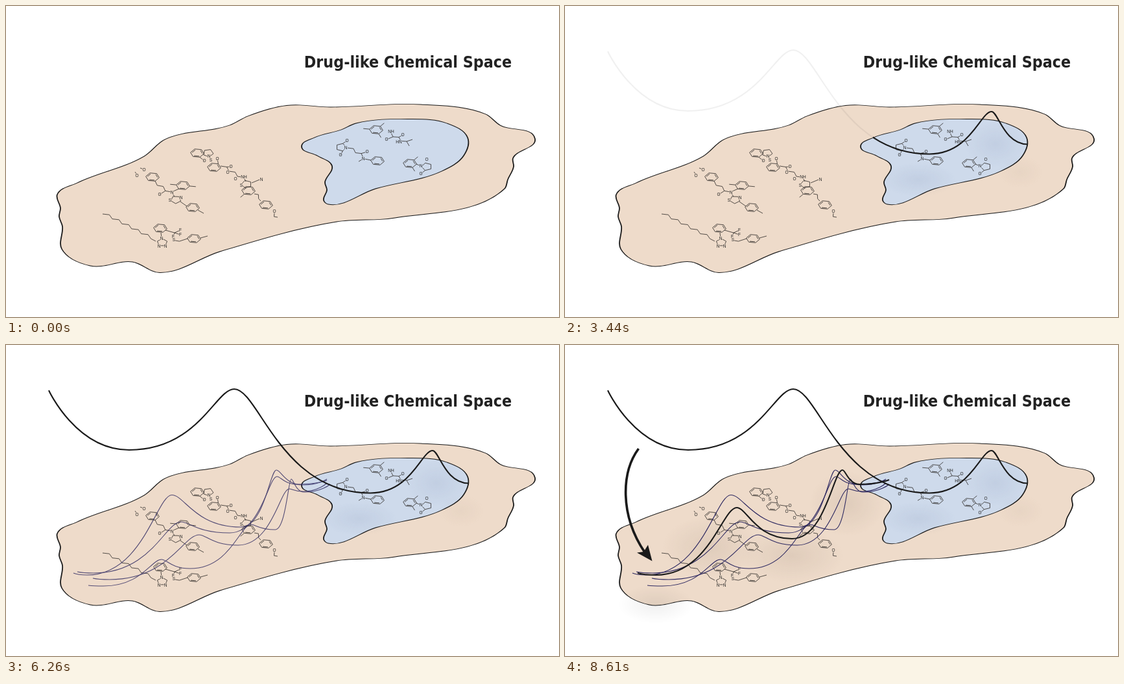
Animation of 853x480 px, one loop 9.74 s. Source, as an HTML page:

```html
<!DOCTYPE html>
<html lang="en">
<head>
<meta charset="utf-8">
<title>Drug-like Chemical Space</title>
<style>
html, body { margin: 0; width: 100%; height: 100%; overflow: hidden; background: #fff; }
svg { display: block; width: 100vw; height: 100vh; }
path { fill: none; stroke: #1a1a1a; stroke-linejoin: round; }
.title { font: bold 24.8px "DejaVu Sans Condensed", "DejaVu Sans", sans-serif; font-stretch: condensed; fill: #222; }
#molecules path { stroke: #2b2725; stroke-width: .8; }
#molecules text { font: 6.5px "Liberation Sans", sans-serif; fill: #222; text-anchor: middle; paint-order: stroke; stroke-width: 1.6; }
#trails path { stroke: #2d2860; }
.fade { opacity: 0; animation: 9740ms steps(16, start) infinite; }
.one { animation-name: one; }
.two { animation-name: two; }
.three { animation-name: three; }
.four { animation-name: four; }
/* Each reveal takes 16 steps of 60 ms. */
@keyframes one { 0%, 13.737% { opacity: 0 } 23.593%, 100% { opacity: 1 } }
@keyframes two { 0%, 35.298% { opacity: 0 } 45.154%, 100% { opacity: 1 } }
@keyframes three { 0%, 56.858% { opacity: 0 } 66.715%, 100% { opacity: 1 } }
@keyframes four { 0%, 79.138% { opacity: 0 } 88.994%, 100% { opacity: 1 } }
</style>
</head>
<body>
<svg viewBox="0 0 853 480" preserveAspectRatio="none">
  <defs>
    <radialGradient id="tan"><stop offset="0" stop-color="#6b5644" stop-opacity=".11"/><stop offset="1" stop-color="#6b5644" stop-opacity="0"/></radialGradient>
    <radialGradient id="navy"><stop offset="0" stop-color="#5a6c9a" stop-opacity=".1"/><stop offset="1" stop-color="#5a6c9a" stop-opacity="0"/></radialGradient>
    <radialGradient id="grey"><stop offset="0" stop-color="#000" stop-opacity=".06"/><stop offset="1" stop-color="#000" stop-opacity="0"/></radialGradient>
    <clipPath id="west"><path d="M0 0H475V480H0Z"/></clipPath>
    <clipPath id="east"><path d="M475 0H853V480H475Z"/></clipPath>
  </defs>
  <g id="land"></g>
  <g class="fade four">
    <ellipse cx="140" cy="400" rx="58" ry="30" fill="url(#grey)"/>
    <ellipse cx="225" cy="312" rx="75" ry="48" fill="url(#tan)"/>
    <ellipse cx="350" cy="325" rx="80" ry="42" fill="url(#tan)"/>
    <ellipse cx="435" cy="245" rx="58" ry="50" fill="url(#tan)"/>
  </g>
  <g id="lake"></g>
  <g class="fade one">
    <ellipse cx="664" cy="213" rx="48" ry="36" fill="url(#navy)"/>
    <ellipse cx="545" cy="268" rx="58" ry="26" fill="url(#navy)"/>
    <ellipse cx="702" cy="256" rx="36" ry="25" fill="url(#tan)" opacity=".4"/>
  </g>
  <g id="molecules"></g>
  <g class="fade three" id="trails"></g>
  <g class="fade four" id="route">
    <path d="M113.500 160C87 196 84 262 123 320" stroke-width="3.7"/>
    <path d="M134.500 333.500L111 320.500L121.500 319L128 308.500Z" style="fill:#1a1a1a;stroke:none"/>
  </g>
  <g class="fade one"><g id="well" clip-path="url(#east)"></g></g>
  <g class="fade two"><g id="ridge" clip-path="url(#west)"></g></g>
  <text class="title" x="459.800" y="95">Drug-like Chemical Space</text>
</svg>
<script>
const SAND = "#eedbca", WATER = "#cedaeb";
const parse = s => s ? s.trim().split(/\s+/).map(p => p.split(",").map(Number)) : [];
const gap = (a, b) => Math.hypot(b[0] - a[0], b[1] - a[1]);

function add(id, tag, attrs, text) {
  const node = document.createElementNS("http://www.w3.org/2000/svg", tag);
  for (const key in attrs) node.setAttribute(key, attrs[key]);
  if (text) node.textContent = text;
  document.getElementById(id).append(node);
}

// Closed outline; the widened x axis makes its upright parts heavier.
function region(id, fill, coords) {
  const points = parse(coords), n = points.length;
  const unit = (a, b) => a.map((v, k) => (b[k] - v) / gap(a, b));
  const tangents = points.map((p, i) => {
    const before = unit(points[(i + n - 1) % n], p), after = unit(p, points[(i + 1) % n]);
    return unit([0, 0], before.map((v, k) => v + after[k]));
  });
  const half = ([x, y]) => [x / 2, y];
  let d = "M" + half(points[0]);
  points.forEach((a, i) => {
    const j = (i + 1) % n, b = points[j], reach = gap(a, b) / 3;
    const c1 = a.map((v, k) => v + tangents[i][k] * reach);
    const c2 = b.map((v, k) => v - tangents[j][k] * reach);
    d += `C${half(c1)} ${half(c2)} ${half(b)}`;
  });
  add(id, "path", { d: d + "Z", transform: "scale(2 1)", style: `fill:${fill}`, "stroke-width": .9 });
}

// Line through alternating hills and valleys: wide valleys, tight peaks, free high ends.
function waves(id, width, coords) {
  const points = parse(coords);
  const handle = (i, other) => {
    if (points[i][1] > other[1]) return .66;
    return i && i < points.length - 1 ? .18 : 0;
  };
  let d = "M" + points[0];
  for (let i = 1; i < points.length; i++) {
    const a = points[i - 1], b = points[i], run = b[0] - a[0];
    d += `C${a[0] + run * handle(i - 1, b)},${a[1]} ${b[0] - run * handle(i, a)},${b[1]} ${b}`;
  }
  add(id, "path", { d, "stroke-width": width });
}

function ring(sides, x, y, rx, ry, phase) {
  return Array.from({ length: sides }, (_, k) => {
    const a = (phase + k * 360 / sides) * Math.PI / 180;
    return [x + rx * Math.cos(a), y + ry * Math.sin(a)];
  });
}

function zigzag(x1, y1, x2, y2, n = 1) {
  const side = Math.sign(n), count = Math.abs(n);
  return Array.from({ length: count + 1 }, (_, i) => {
    const t = i / count, bend = i % 2 && i < count ? side : 0;
    return [x1 + (x2 - x1) * t + 3 * bend, y1 + (y2 - y1) * t - 2.6 * bend];
  });
}

// six: x,y,methyl corners; five: x,y,phase; chains: ends,bonds; atoms: label,x,y.
// Every atom is bonded to the nearest corner.
function molecule(ground, { six, five, chains, atoms }) {
  let d = "";
  const corners = [];
  const line = (points, close = "") => { d += "M" + points.join("L") + close; };
  for (const [x, y, ...methyls] of parse(six)) {
    const outer = ring(6, x, y, 10.5, 6.8, 8), inner = ring(6, x, y, 8, 5.2, 8), far = ring(6, x, y, 20, 13, 8);
    line(outer, "Z");
    for (const k of [1, 3, 5]) line([inner[k], inner[(k + 1) % 6]]);
    methyls.forEach(k => line([outer[k], far[k]]));
    corners.push(...outer);
  }
  for (const [x, y, phase] of parse(five)) {
    const points = ring(5, x, y, 8, 6, phase);
    line(points, "Z");
    corners.push(...points);
  }
  for (const ends of parse(chains)) {
    const points = zigzag(...ends);
    line(points);
    corners.push(...points);
  }
  const labels = atoms.split(" ").map(a => a.split(",")).map(([name, x, y]) => [name, [+x, +y]]);
  for (const [, at] of labels) {
    const near = corners.reduce((a, b) => gap(b, at) < gap(a, at) ? b : a);
    if (gap(near, at) > 6) line([near, at]);
  }
  add("molecules", "path", { d });
  for (const [name, [x, y]] of labels) add("molecules", "text", { x, y: y + 2.3, stroke: ground }, name);
}

region("land", SAND, `79,291 110,273 213,232 245,206 345,184 373,170 433,153.5 500,156 640,152 740,167
  762,184 816,205 782,235 783,248 774,268 769,282 600,327 510,333 330,379 237,411.5 195,395 130,401
  86,375 87,340 82,325 84,312`);
region("lake", WATER, `456,217 476,203 517,191 540,181 620,174.5 680,181 712,203 706,231 672,255 570,282
  497,306 490,300 495,284 492,272 503,247 480,231`);

for (const id of ["well", "ridge"]) waves(id, 2.1, "66,70 190,162 352,68 562,228.5 658,163 714,213.5");

waves("trails", 1.1, "104,352 125,355 256,231.5 362,281 417,193 458,216 495,207");
waves("trails", 1.1, "110,350 135,352 270,273 345,290 418,203 450,215 495,209");
waves("trails", 1.1, "134,360 160,362 298,293 358,309 437,222 458,226 495,213");
waves("trails", 1.1, "127,371 150,372 240,331 284,345 378,277 415,285 440,207 460,227 500,215");
waves("route", 2.1, "112,352 140,355 265,251 350,299 428,193 455,215 500,208");

molecule(SAND, {
  six: "295,227 321,249 374,285,2 401,307", five: "312,227,80 371,275,180",
  chains: "331,247,370,271,6 379,273,391,268 383,290,393,301,3 414,319,419,326,-2",
  atoms: "N,313,232 S,316,238 O,306,239 O,326,236 O,347,248 O,342,257 O,354,267 NH,367,264 S,363,277 N,394,268 O,414,317"
});
molecule(SAND, {
  six: "226,264 273,277,0,3 288,311", five: "262,299,20",
  chains: "230,270,255,287,-4 258,286,267,282 257,290,260,294 269,302,279,309 296,315,305,320 212,252,207,250 202,260,199,256",
  atoms: "O,213,253 O,202,262 O,237,291 N,256,288 N,270,296 S,253,300"
});
molecule(SAND, {
  six: "238,343 290,359", five: "241,365,270",
  chains: "149,321,231,363,11 246,346,260,350 239,350,240,358 261,362,280,359,-2 300,358,311,355",
  atoms: "N,240,359 N,236,371 N,246,371 S,259,361 F,269,346 F,269,353 F,258,356"
});
molecule(WATER, {
  six: "571,191,1,3,5",
  chains: "594,196,618,209,-4 618,209,627,206 618,209,622,216",
  atoms: "NH,594,194 O,587,206 O,612,199 HN,606,210"
});
molecule(WATER, {
  six: "573,239", five: "517,218,0",
  chains: "527,219,551,234,4 553,236,563,238 549,237,544,240",
  atoms: "N,524,219 O,526,208 O,516,230 O,557,225 N,551,236"
});
molecule(WATER, {
  six: "623,243,1,5", five: "649,248,180",
  chains: "633,244,640,247",
  atoms: "N,640,247 O,649,237 O,640,259"
});
</script>
</body>
</html>
```
